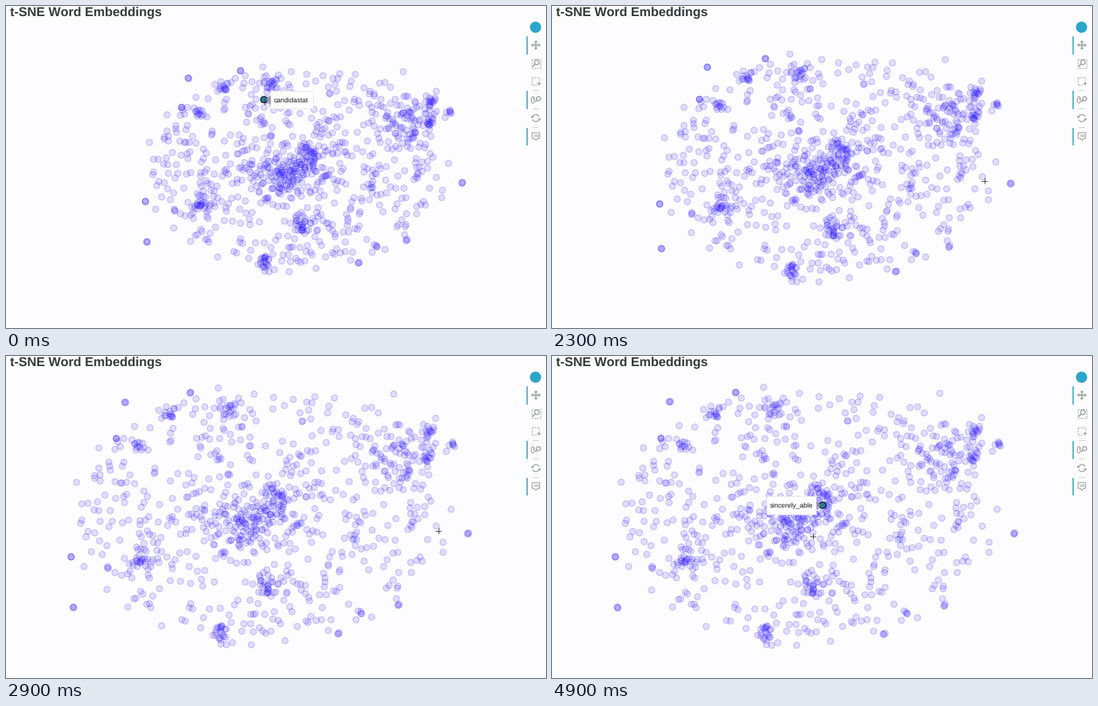
Recreate the animation shown at these times as a matplotlib script. Size 800 by 478 pixels, loop 5000 ms.

```python
import matplotlib.pyplot as plt
import numpy as np
from matplotlib.animation import FuncAnimation
from matplotlib.patches import Circle, Polygon, Rectangle

W, H, DPI = 800, 478, 100
FRAMES, INTERVAL = 50, 100
PT = 72 / DPI
PAPER, BLUE, GREY, TEAL = "#fdfcfe", "#2a14ff", "#a1a5a8", "#52aec9"

plt.rcParams["font.family"] = "Liberation Sans"
plt.rcParams["text.hinting"] = "none"
plt.rcParams["text.hinting_factor"] = 1

fig = plt.figure(figsize=(W / DPI, H / DPI), dpi=DPI, facecolor=PAPER)
ax = fig.add_axes([0, 0, 1, 1])
ax.set(xlim=(0, W), ylim=(H, 0))
ax.axis("off")


def line(xs, ys, color=GREY, width=1.2, z=3, **kw):
    kw.setdefault("solid_capstyle", "butt")
    return ax.plot(xs, ys, color=color, lw=width * PT, zorder=z, **kw)[0]


def shape(patch, fill="none", edge="none", width=1.0, z=3, **kw):
    patch.set(facecolor=fill, edgecolor=edge, linewidth=width * PT, zorder=z, **kw)
    return ax.add_patch(patch)


def label(x, y, text, size, color="#161616", z=5, **kw):
    return ax.text(x, y, text, fontsize=size * PT, color=color, zorder=z, **kw)


# ---- word cloud -----------------------------------------------------------

rng = np.random.default_rng(5)
CENTER, RADII = np.array([428, 240]), np.array([226, 151])

# Near-identical words
STACKS = [(206, 290), (208, 350), (269, 107), (259, 150), (347, 96),
          (676, 263), (592, 347), (549, 356), (522, 381)]
# Dense neighbourhoods: x, y, spread
CLUSTERS = [(626, 140, 5), (627, 173, 4), (656, 157, 2), (453, 221, 9),
            (416, 247, 18), (394, 115, 7), (322, 122, 5), (285, 157, 4),
            (287, 290, 9), (437, 324, 7), (384, 379, 7), (590, 160, 24)]


def ring(angle, radius):
    """Points at a fraction of the cloud's elliptical outline."""
    unit = np.column_stack([np.cos(angle), np.sin(angle)])
    return CENTER + RADII * unit * radius[:, None]


def blob(x, y, spread, count):
    return rng.normal((x, y), spread, (count, 2))


def body(count, power=0.72):
    return ring(rng.uniform(0, 2 * np.pi, count),
                0.93 * rng.uniform(0, 1, count) ** power)


def rim(count):
    step = np.arange(count) + rng.uniform(-0.4, 0.4, count)
    return ring(2 * np.pi * step / count, rng.uniform(0.86, 1.03, count))


words = np.vstack(
    [body(580), rim(56)]
    + [blob(x, y, 0.8, 3) for x, y in STACKS]
    + [blob(x, y, s, 3 * s) for x, y, s in CLUSTERS]
)
rng.shuffle(words)

cloud = ax.scatter(*words.T, s=(9.2 * PT) ** 2, facecolor=(BLUE, 0.13),
                   edgecolor=(BLUE, 0.3), linewidth=0.9 * PT, zorder=2)

ZOOM_AT = np.array([640, 259])
ZOOM_START, ZOOM_END, ZOOM_GAIN = 20.9, 30, 0.2585


def zoom(frame):
    if frame >= ZOOM_END:
        return 1 + ZOOM_GAIN
    t = max(frame - ZOOM_START, 0)
    return 1 + ZOOM_GAIN * (1 - np.exp(-0.1845 * t ** 1.452))


# ---- title and toolbar ----------------------------------------------------

label(6, 14.8, "t-SNE Word Embeddings", 18.7, "#373b3b", weight="bold")


def dashed_box(x, y, half):
    xs, ys = np.array([-1, 1, 1, -1, -1]), np.array([-1, -1, 1, 1, -1])
    line(x + half * xs, y + half * ys, width=1.1, dashes=(2, 1.4))


def magnifier(x, y, r, handle):
    shape(Circle((x, y), r), edge=GREY, width=1.6)
    d = r * 0.7
    line([x - d, x - d - handle], [y + d, y + d + handle], width=2)


def plus(x, y, half, width):
    line([x - half, x + half], [y, y], width=width)
    line([x, x], [y - half, y + half], width=width)


def pan_icon(x, y):
    plus(x, y, 5, 1.8)
    for dx, dy in [(1, 0), (-1, 0), (0, 1), (0, -1)]:
        bx, by = x + 4 * dx, y + 4 * dy
        shape(Polygon([(x + 7.2 * dx, y + 7.2 * dy),
                       (bx - 3 * dy, by + 3 * dx),
                       (bx + 3 * dy, by - 3 * dx)]), GREY)


def box_zoom_icon(x, y):
    dashed_box(x, y, 6.5)
    magnifier(x + 1.5, y - 1.5, 3.4, 4)


def box_select_icon(x, y):
    dashed_box(x - 1, y - 1, 5.5)
    shape(Rectangle((x + 1, y), 7, 7), PAPER)
    plus(x + 4.5, y + 3.2, 2.8, 1.6)


def wheel_icon(x, y):
    a = np.linspace(0, 2 * np.pi, 40)
    line(x - 4.4 + 2.4 * np.cos(a), y + 4.8 * np.sin(a), width=1.3)
    line([x - 4.4, x - 4.4], [y - 3, y], width=1)
    magnifier(x + 4, y - 1.8, 3, 2.6)


def reset_icon(x, y):
    for side in (1, -1):
        a = np.linspace(0.25, np.pi - 0.45, 20)
        line(x + side * 5.2 * np.cos(a), y + side * 5.2 * np.sin(a), width=1.5)
        shape(Polygon([(x + 7 * side, y + 0.2 * side),
                       (x + 2.6 * side, y + 0.6 * side),
                       (x + 6.4 * side, y + 4 * side)]), GREY)


def hover_icon(x, y):
    shape(Polygon([(x - 5.5, y - 5.5), (x + 5.5, y - 5.5), (x + 5.5, y + 3),
                   (x + 2.5, y + 3), (x, y + 6), (x - 2.5, y + 3),
                   (x - 5.5, y + 3)]), edge=GREY, width=1.3)
    for dy in (-3, -0.5):
        line([x - 3.5, x + 3.5], [y + dy, y + dy], width=1)


shape(Circle((784.5, 31.5), 8.3), "#2ba6c9")
ICONS = [pan_icon, box_zoom_icon, box_select_icon, wheel_icon, reset_icon,
         hover_icon]
ACTIVE = (pan_icon, wheel_icon, hover_icon)
for i, icon in enumerate(ICONS):
    y = 58 + 27.1 * i
    icon(785, y)
    if icon in ACTIVE:
        shape(Rectangle((770.8, y - 13), 1.9, 26.5), TEAL)
    if i > 2:
        line([780, 789], [y - 14, y - 14], "#d2d2d4", 1.2)


# ---- tooltips and pointer -------------------------------------------------

def tooltip(mark, left, width, *rows):
    """Highlighted word with a callout listing the words under the pointer."""
    mx, my = mark
    height = 23.5 * len(rows) + 3
    top = my - height / 2
    on_right = left > mx
    base = left if on_right else left + width
    tip = base - 7 if on_right else base + 7
    parts = [
        shape(Circle(mark, 4.7), "#237f9c", "#141c20", 1.4, 4),
        shape(Polygon([(tip, my), (base, my - 7), (base, my + 7)]),
              "#909094", z=4, alpha=0.85),
        shape(Rectangle((left, top), width, height), "#fefefe", "#e6e5e8",
              1, 4),
    ]
    for i, text in enumerate(rows):
        y = top + 13.5 + 23.5 * i
        parts.append(label(left + 5, y, text, 10.4, va="center_baseline"))
        if i:
            parts.append(line([left + 4, left + width - 4], [y - 10, y - 10],
                              "#cfcfd2", 0.9, 5, dashes=(1, 1.5)))
    return parts


# first frame, last frame, artists
TOOLTIPS = [
    (0, 0, tooltip((382, 139), 392, 63, "candidastat")),
    (34, 36, tooltip((365, 264), 376, 91, "radical", "amalgam_remove")),
    (47, 49, tooltip((401, 221.5), 317.5, 73.5, "sincerely_able")),
]

# Pointer stops: frame, x, y
STOPS = np.array([(0, 382, 142), (11, 666, 253), (13, 640, 259),
                  (31, 640, 259), (35, 369, 240), (46, 369, 240),
                  (49, 386, 267)])
arms = [line([], [], "#2c2c2c", 0.9, 6) for _ in range(2)]


def pointer(frame):
    return [round(np.interp(frame, STOPS[:, 0], STOPS[:, k])) + 0.5
            for k in (1, 2)]


def draw(frame):
    cloud.set_offsets(ZOOM_AT + (words - ZOOM_AT) * zoom(frame))
    x, y = pointer(frame)
    arms[0].set_data([x - 4.5, x + 4.5], [y, y])
    arms[1].set_data([x, x], [y - 4.5, y + 4.5])
    for first, last, parts in TOOLTIPS:
        for part in parts:
            part.set_visible(first <= frame <= last)
    return [cloud, *arms]


anim = FuncAnimation(fig, draw, frames=FRAMES, interval=INTERVAL,
                     repeat=True, repeat_delay=0, blit=False)
plt.show()
```
